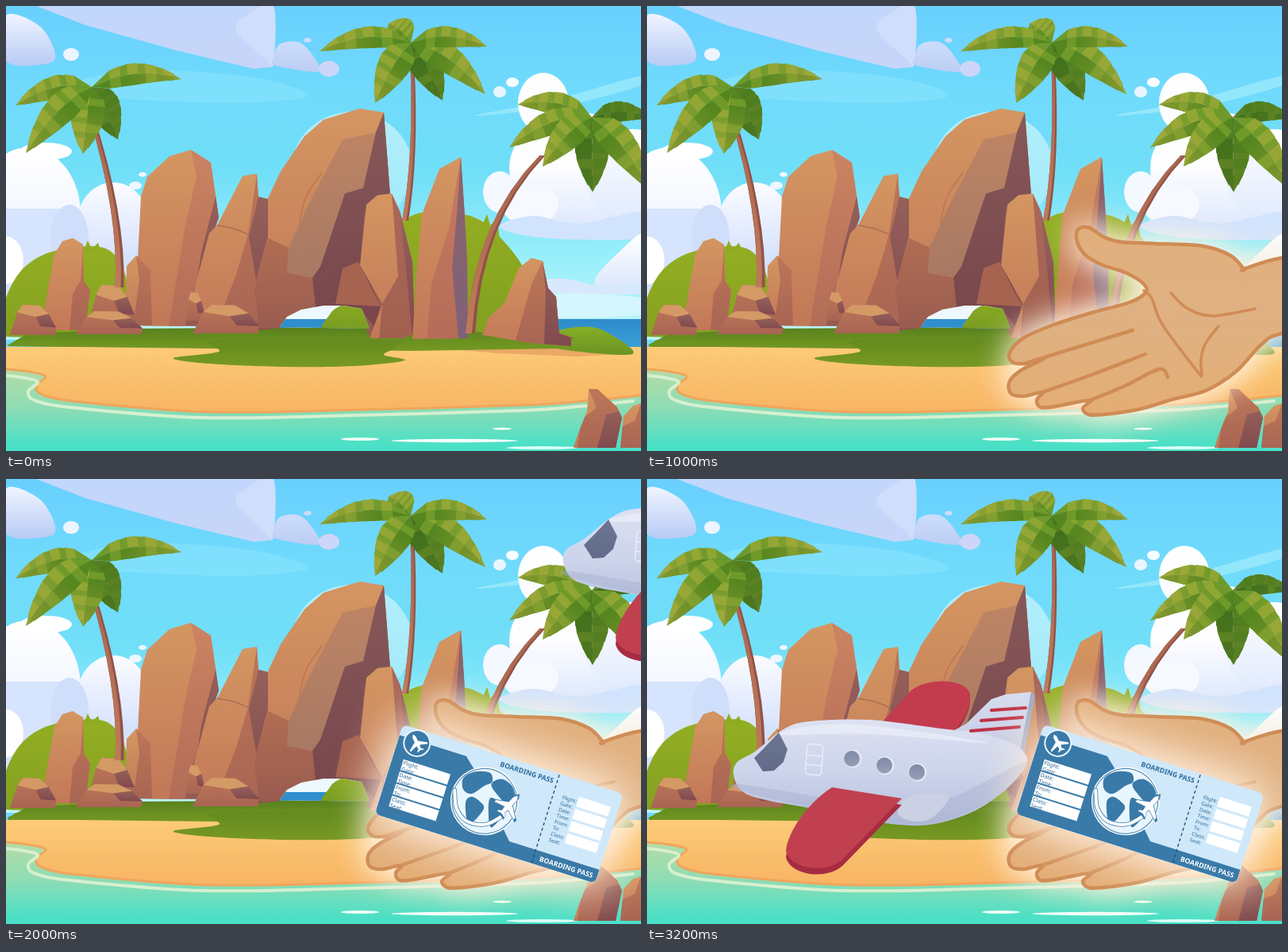
These frames come from a looping animation (800x560 px, 5200 ms). An HTML page with a canvas:

```html
<!DOCTYPE html>
<html lang="en">
<head>
<meta charset="utf-8">
<title>Island trip</title>
<style>
html, body { margin: 0; width: 800px; height: 560px; overflow: hidden; background: #72dafc; }
canvas { display: block; }
</style>
</head>
<body>
<canvas id="stage" width="800" height="560"></canvas>
<script>
const W = 800, H = 560, STEP = 200, LOOP = 5200;
const stage = document.getElementById('stage').getContext('2d');
let c = stage;

const points = s => s.trim().split(/\s+/).map(p => p.split(',').map(Number));
const mix = (a, b, k) => a + (b - a) * k;

// "a>b" is a vertical gradient over the height of the shape
function paint(fill, pts) {
  if (!fill.includes('>')) return fill;
  const ys = pts.map(p => p[1]);
  const g = c.createLinearGradient(0, Math.min(...ys), 0, Math.max(...ys));
  const stops = fill.split('>');
  stops.forEach((s, i) => g.addColorStop(i / (stops.length - 1), s));
  return g;
}

function curve(pts, closed) {
  const n = pts.length;
  const at = i => closed ? pts[(i + n) % n] : pts[Math.max(0, Math.min(n - 1, i))];
  c.beginPath();
  c.moveTo(...pts[0]);
  for (let i = 0; i < (closed ? n : n - 1); i++) {
    const [a, b, d, e] = [at(i - 1), at(i), at(i + 1), at(i + 2)];
    c.bezierCurveTo(b[0] + (d[0] - a[0]) / 6, b[1] + (d[1] - a[1]) / 6,
      d[0] - (e[0] - b[0]) / 6, d[1] - (e[1] - b[1]) / 6, d[0], d[1]);
  }
  if (closed) c.closePath();
}

function fillPoints(fill, pts) {
  c.beginPath();
  pts.forEach(p => c.lineTo(...p));
  c.closePath();
  c.fillStyle = paint(fill, pts);
  c.fill();
}

const poly = (fill, s) => fillPoints(fill, points(s));

function blob(fill, s) {
  const pts = points(s);
  curve(pts, true);
  c.fillStyle = paint(fill, pts);
  c.fill();
}

function line(color, width, s) {
  curve(points(s), false);
  c.strokeStyle = color;
  c.lineWidth = width;
  c.lineCap = c.lineJoin = 'round';
  c.stroke();
}

function oval(fill, x, y, rx, ry = rx) {
  c.beginPath();
  c.ellipse(x, y, rx, ry, 0, 0, 7);
  c.fillStyle = paint(fill, [[x, y - ry], [x, y + ry]]);
  c.fill();
}

function rect(fill, x, y, w, h) {
  c.fillStyle = paint(fill, [[x, y], [x, y + h]]);
  c.fillRect(x, y, w, h);
}

function shape(fill, path) {
  c.fillStyle = fill;
  c.fill(new Path2D(path));
}

function layer(draw) {
  const cv = document.createElement('canvas');
  cv.width = W;
  cv.height = H;
  c = cv.getContext('2d');
  draw();
  c = stage;
  return cv;
}

function glowing(color, blur, draw) {
  c.shadowColor = color;
  c.shadowBlur = blur;
  draw();
  draw();
  c.shadowBlur = 0;
  c.shadowColor = 'transparent';
}

function sky() {
  rect('#69d0fe>#70dafc>#70dff7>#98effb>#c0f6fc', 0, 0, W, 420);
  blob('rgba(150,232,252,.4)', '60,110 150,82 300,88 380,112 300,122 170,118');
  blob('rgba(170,240,252,.6)', '590,138 690,118 800,88 800,100 700,126');
  oval('#b4eefd>#a0ebf9', 436, 205, 76, 72);
  // upper clouds
  poly('#c2d7fc>#c7d5f8', '38,0 100,24 215,56 312,79 334,77 338,55 337,0');
  blob('#d0defc', '290,30 306,10 337,0 337,72 326,66');
  blob('#eef3ff>#b9ccf6', '0,12 42,25 62,60 50,73 0,69');
  blob('#cbdcfb>#bccdf4', '337,66 345,48 372,47 394,74 390,83 340,75');
  oval('#eef4ff', 82, 61, 10, 8);
  oval('#cdd6f8', 407, 79, 13, 10);
  oval('#cbdcfb', 380, 43, 5, 3);
  // left bank
  oval('#fff>#f3f7ff>#cfdffb', 28, 262, 66, 84);
  oval('#fff', 50, 183, 33, 11);
  rect('#d6e4fd', 0, 255, 185, 130);
  oval('#fbfcff>#e6edff>#d0e0fc', 135, 275, 46, 53);
  oval('#cfdefb', 80, 292, 24, 42);
  oval('#fff', 0, 320, 22, 30);
  oval('#eef6ff', 163, 226, 8, 5);
  oval('#eef6ff', 172, 212, 5, 3);
  // right bank
  oval('#fff>#fafcff', 677, 122, 32, 38);
  oval('#f4f8ff', 622, 234, 21, 26);
  oval('#fff>#fdfdff>#dfe9fd', 720, 204, 86, 70);
  oval('#fff>#dfe9fd', 790, 215, 60, 60);
  oval('#f6f9ff', 660, 250, 36, 26);
  oval('#e9f6ff', 622, 108, 8, 7);
  oval('#f8fdff', 638, 96, 8, 6);
  blob('#d2e4fd', '622,276 665,264 720,274 810,258 810,290 720,294 650,288');
  blob('#fff>#dbe7fd', '742,350 772,310 806,288 806,356');
  blob('#d9e9fd', '645,350 700,343 750,352 806,346 806,362 665,360');
  blob('#d4f6fd', '640,374 700,362 806,368 806,388 650,392');
  rect('#2f8bcb>#3ba5da', 330, 394, 470, 44);
}

function shore() {
  rect('#fdcb78>#f9bd6b>#f7ae60', 0, 429, W, 100);
  poly('#eaa966', '560,432 700,430 776,438 720,441 620,437');
  const edge = '0,457 28,460 50,466 38,478 48,490 100,499 260,511 450,508 660,502 730,497 800,490';
  blob('#b5dca5>#8fdcb4>#4be0c6>#42e5d2', '-60,456 ' + edge + ' 860,485 860,600 -60,600');
  line('#f0a55c', 3, edge);
  c.save();
  c.translate(-10, 7);
  line('#d5f0d0', 4, edge);
  c.restore();
  oval('#effff8', 446, 545, 24, 2);
  oval('#f4fffb', 565, 547, 80, 2.2);
  oval('#effff8', 625, 532, 12, 1.5);
  oval('#dcfff5', 675, 556, 45, 2);
}

function greenery() {
  blob('#93ae22>#84a121', '-6,400 2,362 24,328 62,308 122,304 148,332 156,380 150,412 0,416');
  blob('#94ad22>#80a020', '494,290 505,268 530,259 565,260 604,274 650,326 656,370 650,420 500,418');
  poly('#8fab20', '97,310 103,295 108,306 116,298 120,310');
  poly('#8fab20', '598,280 606,262 610,276 618,268 622,292');
  blob('#86ae27>#6b9522', '690,412 720,404 752,408 789,438 690,430');
  poly('#587f1d>#688f20>#769922', '2,427 26,413 150,406 470,404 716,417 700,431 510,434 2,428');
  blob('#648b20>#789922', '268,420 268,435 211,443 255,450 350,454 440,453 502,446 476,439 490,430 480,420');
}

const LIT = '#d49661>#c27858', MID = '#bd7658>#a86553', DARK = '#95605a>#814a4e';

// A lit outline; every facet shades what lies to the right of its ridge
function rock(outline, ...facets) {
  c.save();
  poly(LIT, outline);
  c.clip();
  for (const [fill, ridge] of facets) {
    const pts = points(ridge), end = pts[pts.length - 1];
    fillPoints(fill, [...pts, [W, end[1]], [W, pts[0][1]]]);
  }
  c.restore();
}

function stone(x, y, w, h) {
  const place = s => points(s).map(([u, v]) => [x + u * w, y + v * h]);
  fillPoints(MID, place('0,1 .16,.25 .28,0 .64,.02 .84,.3 1,.75 .98,1'));
  fillPoints('#d49a66', place('.16,.25 .28,0 .64,.02 .84,.3 .56,.4'));
  fillPoints(DARK, place('.56,.4 .84,.3 1,.75 .66,.72'));
}

function rocks() {
  poly('#955a50', '152,402 182,330 240,300 330,245 450,240 500,330 515,410 460,418 440,384 368,384 346,404');
  rock('44,408 54,350 61,312 71,296 84,292 97,300 98,345 106,358 100,408', [MID, '97,300 94,345 84,362 80,408']);
  rock('152,402 166,318 170,240 178,215 206,189 233,181 258,197 268,266 232,368 225,403',
    ['#cb8362>#b36c57', '233,181 240,215 226,275 205,403'], [DARK, '264,240 246,310 232,403']);
  rock('150,402 152,327 164,314 182,332 184,402', [MID, '164,314 168,345 160,402']);
  rock('232,376 256,286 266,276 298,214 316,211 318,240 330,243 333,300 350,345 344,405 300,410 240,382',
    [MID, '316,211 305,287 290,338 262,410'], [DARK, '318,240 306,290 316,350 318,410']);
  line('#b06d53', 1.5, '266,276 286,280 305,287');
  rock('330,290 330,242 346,208 376,164 400,143 446,129 476,134 484,238 452,260 447,320 472,378 465,405 448,384 405,379 368,384 346,404 320,406 312,358',
    ['#c08665>#a07462', '476,134 466,159 424,168 382,248 356,304 354,336 390,410'],
    ['#86595a>#78454b', '476,134 466,159 450,229 427,236 396,328 386,342 390,410']);
  poly('#b06d53>#9a5c50', '330,292 356,304 354,336 386,342 390,378 368,384 346,404 320,406 312,358');
  poly('#a6634f', '424,330 444,322 472,378 415,375');
  line('#bb7652', 1.5, '398,210 378,240 370,272');
  // view through the arch
  c.save();
  poly('#eef8ff', '345,404 354,391 372,382 400,377 425,377 448,381 458,406');
  c.clip();
  rect('#2f8fcd', 340, 394, 130, 12);
  blob('#8cab23>#769b22', '401,410 408,388 420,378 440,372 470,380 470,410');
  c.restore();
  rock('446,326 454,250 468,238 486,236 496,258 512,322 515,412 500,418 458,418 474,375',
    ['#a9685a>#a1604f', '486,236 494,340 474,375 470,418'], [DARK, '496,258 504,330 512,418']);
  rock('512,419 517,340 524,262 546,205 573,190 577,250 581,320 582,418',
    ['#c77c5f>#b56c58', '573,190 558,280 536,350 530,419'],
    ['#8c6468>#7f617a', '573,190 568,260 562,330 570,419']);
  rock('600,414 608,392 628,374 646,330 662,317 676,321 683,355 693,366 697,412 712,417 712,428 660,424',
    [MID, '676,321 662,350 640,428'], [DARK, '676,321 680,360 678,428']);
  stone(5, 376, 58, 38);
  stone(104, 351, 58, 50);
  stone(88, 384, 84, 29);
  stone(226, 360, 24, 36);
  stone(235, 376, 84, 36);
  rock('715,556 720,540 732,510 734,482 745,482 770,505 776,518 768,556',
    [MID, '734,482 744,506 725,520 720,556'], [DARK, '772,510 756,514 745,556']);
  rock('774,556 778,516 790,503 800,500 800,556', [MID, '800,500 792,522 774,530 774,556']);
}

function trunk(top, bend, foot, thin, thick) {
  const left = [], right = [], mid = [];
  for (let k = 0; k <= 1; k += .125) {
    const at = i => mix(mix(top[i], bend[i], k), mix(bend[i], foot[i], k), k);
    const half = mix(thin, thick, k) / 2;
    left.push([at(0) - half, at(1)]);
    mid.unshift([at(0) + half * .3, at(1)]);
    right.unshift([at(0) + half, at(1)]);
  }
  fillPoints('#8f5349', [...left, ...right]);
  fillPoints('#a9644f>#c07a5a', [...left, ...mid]);
}

// Arched blade from base to tip, wider the more it hangs
function leaf([bx, by], [tx, ty], deep) {
  const dx = tx - bx, dy = ty - by, d = Math.hypot(dx, dy);
  const lift = .2 * Math.abs(dx) + .08 * Math.abs(dy);
  const half = 13 + 9 * Math.abs(dy) / d;
  const side = dx < 0 ? -1 : 1;
  const nx = -dy / d * side, ny = dx / d * side;
  const at = (k, off) => {
    const w = off * half * Math.sin(Math.PI * k ** .8) ** .8;
    return [bx + dx * k + nx * w, by + dy * k - 2 * lift * k * (1 - k) + ny * w];
  };
  const ks = [0, .2, .4, .6, .8, 1];
  const band = (fill, k0, k1, off) =>
    fillPoints(fill, [at(k0, 0), at(k1, 0), at(k1, off), at(k0, off)]);
  const tones = deep ? ['#4d7c1f', '#567f22', '#41701c'] : ['#8fa634', '#6f9a2a', '#55861f'];
  for (const off of [-1, 1]) {
    fillPoints(tones[off < 0 ? 1 : 2], [...ks.map(k => at(k, 0)), ...ks.map(k => at(k, off)).reverse()]);
    ks.slice(1, -1).forEach((k, i) => band(tones[off < 0 ? 0 : i % 2 + 1], k, k + .12, off));
  }
  const g = c.createLinearGradient(bx, by, tx, ty);
  g.addColorStop(.3, 'rgba(180,172,64,0)');
  g.addColorStop(1, deep ? 'rgba(120,140,40,.2)' : 'rgba(180,172,64,.55)');
  c.beginPath();
  [...ks.map(k => at(k, -1)), ...ks.map(k => at(k, 1)).reverse()].forEach(p => c.lineTo(...p));
  c.fillStyle = g;
  c.fill();
}

function crown(base, deepTips, tips) {
  points(deepTips).forEach(p => leaf(base, p, true));
  points(tips).forEach(p => leaf(base, p, false));
}

function palms() {
  trunk([107, 136], [147, 264], [143, 354], 6, 11);
  crown([108, 102], '141,168', '97,186 12,125 25,185 221,92');
  trunk([512, 75], [517, 190], [503, 270], 5, 8);
  crown([510, 46], '550,119', '482,22 395,57 604,111 465,122 606,51');
  trunk([676, 188], [595, 270], [585, 412], 7, 12);
  crown([738, 140], '812,140 739,234', '645,124 634,178 812,232 676,202');
}

function wing(top, edge, drop, path) {
  c.save();
  c.translate(0, drop);
  shape(edge, path);
  c.restore();
  shape(top, path);
}

function airplane() {
  wing('#c23c4e', '#a12b40', 3, 'M296,306L333,266C352,250 400,250 407,270C408,290 400,300 388,318Z');
  poly('#d8dcef>#c2c9e1', '384,318 402,308 434,277 452,271 484,268 474,348 430,352');
  poly('#9fa8c5', '484,268 489,272 475,348 469,348');
  blob('#dde1f2>#ccd4eb>#b7bfdb', '109,372 114,356 136,343 172,315 205,305 280,303 370,314 420,320 462,334 479,352 468,374 438,402 398,424 345,436 280,430 215,416 150,404 120,393');
  blob('rgba(240,242,252,.6)', '168,322 205,311 280,310 430,332 280,321');
  blob('rgba(160,170,203,.4)', '116,384 230,402 300,411 380,402 477,356 438,402 345,435 215,415 121,393');
  blob('#cbd0e4', '316,422 326,402 350,396 380,400 362,424 340,431');
  poly('#6c7693>#626c8a', '166,319 177,340 172,356 160,367 146,368 135,351 148,338');
  c.save();
  c.transform(1, .1, -.08, 1, 233, 314);
  c.strokeStyle = '#edf0fa';
  c.lineWidth = 1.3;
  c.beginPath();
  c.roundRect(-29, 22, 20, 38, 4);
  c.roundRect(-29, 36, 20, 12, 2);
  c.stroke();
  c.restore();
  for (let i = 0; i < 3; i++) {
    const x = 258 + i * 41, y = 352 + i * 8.5;
    oval('#e4e8f4', x + 1, y, 11.5);
    oval('#7e89a5>#97a0b8', x, y, 10);
    line('#be3045', 4, `${434 - i * 13},${291 + i * 13} ${477 - i * 4},${288 + i * 12}`);
  }
  wing('#c0404f', '#a72c42', 8, 'M233,388L321,402L246,479C225,497 181,491 175,468C177,445 200,410 233,388Z');
}

const WRIST = '900,306 800,317 752,331 752,331 ';
const THUMB = '735,314 700,302 640,299 598,297 576,291 557,279 543,281 542,297 553,314 574,326 604,336 626,350 628,361 ';
const FINGERS = '608,373 560,386 510,402 474,418 457,436 460,448 476,450 500,444 472,458 457,472 458,487 474,491 498,486 ' +
  '491,496 496,505 514,504 558,496 549,506 556,514 576,514 622,507 662,495 ';
const HAND = WRIST + THUMB + FINGERS + '704,484 742,460 774,426 800,412 900,390';

function hand() {
  const crease = '#cf8c54';
  glowing('rgba(255,242,224,.95)', 42, () => blob('#e2af7d', HAND));
  blob('#e2af7d>#dfb182>#e4ad74', HAND);
  line(crease, 4.5, HAND);
  ['476,450 530,433 612,408', '498,486 555,466 628,438', '556,497 600,479 645,457 656,467']
    .forEach(s => line(crease, 4.5, s));
  ['626,358 636,368 650,402 698,466', '660,361 680,380 712,390 766,381', '720,403 704,424 698,444 699,465']
    .forEach(s => line(crease, 3.5, s));
}

function text(s, x, y, font, fill) {
  c.font = font + ' "Noto Sans", "Open Sans", sans-serif';
  c.fillStyle = fill;
  c.fillText(s, x, y);
}

function jet(x, y, size, turn, fill) {
  c.save();
  c.translate(x, y);
  c.rotate(turn);
  c.scale(size, size);
  const half = points('0,-11 2,-8 2,-2 11,4 11,6 2,3 1.5,7 4,9 4,10 0,9');
  fillPoints(fill, [...half, ...half.map(([u, v]) => [-u, v]).reverse()]);
  c.restore();
}

function globe(x, y, deep) {
  c.save();
  c.translate(x, y);
  oval('#fff', 0, 0, 43);
  oval(deep, 0, 0, 41.5);
  oval('#eaf6fe', 0, 0, 40.5);
  c.clip();
  blob(deep, '-34,-20 -22,-32 -4,-36 2,-26 -6,-18 -18,-4 -30,-6');
  blob(deep, '-18,0 -6,2 2,10 -10,33 -22,10');
  blob(deep, '2,-22 12,-33 28,-28 37,-12 30,-2 20,-8');
  blob(deep, '6,-6 18,-4 28,5 18,29 8,9');
  c.restore();
  const trail = `${x - 40},${y - 2} ${x - 31},${y + 19} ${x - 13},${y + 31} ${x + 11},${y + 27} ${x + 28},${y + 10}`;
  line(deep, 5.5, trail);
  line('#fff', 4, trail);
  jet(x + 31, y - 4, 1.8, .45, deep);
  jet(x + 31, y - 4, 1.5, .45, '#fff');
}

function ticket() {
  const deep = '#3a7aa8', pale = '#cfe8fa', ink = '#2c6a98';
  const labels = ['Flight:', 'Gate:', 'Date:', 'Time:', 'From:', 'To:', 'Class:', 'Seat:'];
  c.translate(500, 309);
  c.rotate(.305);
  const card = () => {
    c.beginPath();
    c.roundRect(0, 0, 291, 118, 7);
    c.fillStyle = pale;
    c.fill();
  };
  glowing('rgba(255,238,222,.9)', 60, card);
  card();
  c.save();
  c.clip();
  poly(deep, '0,14 88,14 103,27 103,85 158,85 172,100 291,100 291,118 0,118');
  c.restore();

  oval('#e9f5fd', 24, 17, 17.5);
  oval(deep, 24, 17, 15.5);
  jet(24, 17, 1.1, -.75, '#fff');

  for (let i = 0; i < 4; i++) {
    rect('#fff', 14, 41.5 + i * 16, 62, 14);
    rect('#fff', 239, 20 + i * 16, 42, 13);
  }
  labels.forEach((s, i) => {
    text(s, 15, 48 + i * 8, '7px', ink);
    text(s, 219, 29 + i * 8, '6.5px', ink);
  });
  text('BOARDING PASS', 132, 13.5, 'bold 8.7px', ink);
  text('BOARDING PASS', 215, 112.5, 'bold 8.7px', '#fff');

  c.setLineDash([4, 3]);
  c.strokeStyle = '#244f70';
  c.lineWidth = 1.3;
  c.beginPath();
  c.moveTo(207, 1);
  c.lineTo(207, 117);
  c.stroke();
  c.setLineDash([]);
  globe(127, 61, deep);
}

const island = layer(() => { sky(); shore(); greenery(); rocks(); palms(); });
const plane = layer(airplane);
const palm = layer(hand);
const pass = layer(ticket);

// [time, x, y] offsets from the landing place
const flight = [[1800, 645, -274], [2000, 593, -268], [2400, 395, -176], [2800, 134, -50], [3000, 0, 0]];

function along(keys, t) {
  if (t <= keys[0][0]) return keys[0].slice(1);
  const i = keys.findIndex(k => k[0] >= t);
  if (i < 0) return keys[keys.length - 1].slice(1);
  const [a, b] = [keys[i - 1], keys[i]];
  const k = (t - a[0]) / (b[0] - a[0]);
  return [mix(a[1], b[1], k), mix(a[2], b[2], k)];
}

function frame(now) {
  const t = Math.floor(now % LOOP / STEP) * STEP;
  stage.drawImage(island, 0, 0);
  if (t >= 1400) stage.drawImage(plane, ...along(flight, t));
  if (t >= 200) stage.drawImage(palm, Math.max(0, 1000 - t) * .381, 0);
  if (t > 1000) {
    stage.globalAlpha = Math.min(1, (t - 1000) / 1000);
    stage.drawImage(pass, 0, 0);
    stage.globalAlpha = 1;
  }
}

const start = performance.now();
function tick() {
  frame(performance.now() - start);
  requestAnimationFrame(tick);
}
tick();
</script>
</body>
</html>
```
